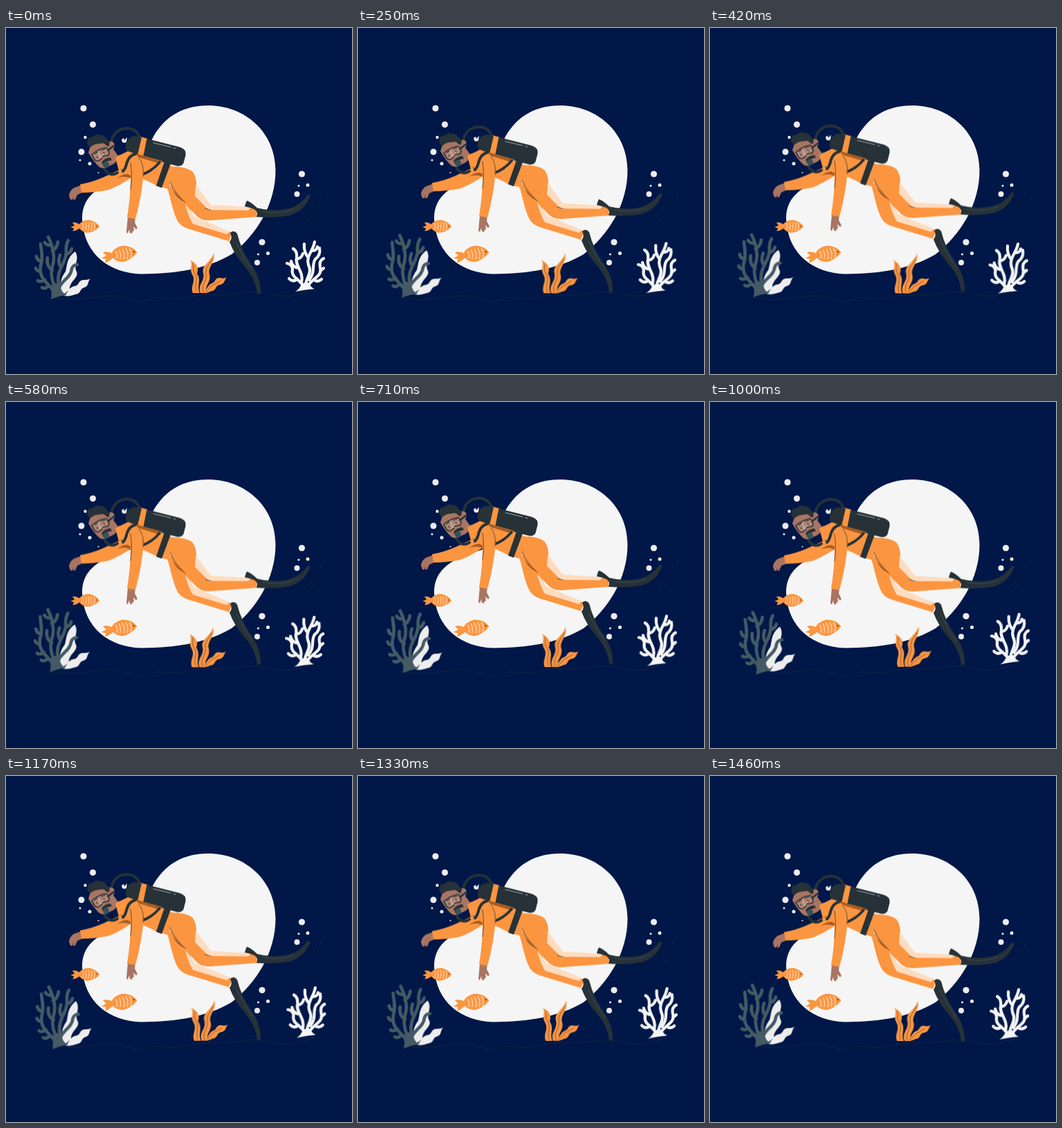
Animation, 500 px wide and 500 px high, one loop 1.5 s. Source, as an HTML page:

```html
<!DOCTYPE html>
<html lang="en">
<head>
<meta charset="utf-8">
<title>Diver</title>
<style>
  html, body { margin: 0; width: 100%; height: 100%; overflow: hidden; background: #001748; }
  svg { display: block; width: 100%; height: 100%; }
  .plants, .diver { transform-box: view-box; transform-origin: 250px 250px; }
  .suit { fill: #fc9540; }
  .dark { fill: #263238; }
  .skin { fill: #a87562; }
  .pale { fill: #ffdcc0; }
  .shade { fill: #a85c22; }
  .snow { fill: #ededed; }
  .white { fill: #f5f5f5; }
  .line { fill: none; stroke: #263238; stroke-linecap: round; stroke-linejoin: round; }
  .thin { stroke-width: .7; }
  .branch { fill: none; stroke-linecap: round; stroke-linejoin: round; }
  .stripe { fill: none; stroke: #fdc697; stroke-width: 1.8; stroke-linecap: round; }
</style>
</head>
<body>
<svg viewBox="0 0 500 500">
  <path class="white" d="M292 112C345 112 389 150 389.500 205C390 255 361 300 326 327C290 348 248 355 195 355.500C150 354 112 328 110 275C110 240 140 224 178 214C205 200 203 165 221 145C238 123 262 112 292 112Z"/>
  <path class="line" stroke-width=".8" opacity=".65" d="M62 389C82 392 98 394 120 390S160 385 180 393S208 388 222 390S250 393 268 388S308 388 330 384S366 381 388 386S424 384 446 378"/>
  <g id="bubbles" class="snow"></g>

  <g class="plants">
    <path class="snow" d="M82 386C75 373 80 360 86 352C89 342 87 333 100 323C107 334 97 343 102 352C106 361 91 366 92 378Z"/>
    <path class="snow" d="M84 387C90 382 91 374 99 373C106 373 104 364 112 364C116 364 119 364 122 362C117 368 120 373 113 375C106 377 109 384 100 385C94 387 90 388 84 387Z"/>
    <g class="branch" stroke="#455a64" stroke-width="4.600">
      <path d="M73 384C66 364 64 354 67 344C71 334 69 318 61 302M67 322Q74 318 75 309M65 314Q58 314 56 310"/>
      <path d="M70 382C62 368 47 364 50 344C54 332 51 322 50 312M51 337Q45 336 44 330M50 352Q44 351 43 347M56 364Q49 368 46 365M62 372Q56 378 52 375"/>
      <path d="M74 384C76 366 94 362 95 348Q97 342 103 342M76 370C72 350 87 340 87 324Q86 314 90 307M87 327Q93 326 95 319M80 346Q74 340 78 328M67 350Q58 344 60 332"/>
    </g>
    <path fill="#455a64" d="M65 392Q67 382 64 374L71 368L79 372Q79 382 88 386Q76 387 65 392Z"/>
    <g class="suit">
      <path d="M281 383C276 371 288 366 285 354C282 342 297 338 300 325C304 338 291 345 294 356C297 368 286 372 290 383Z"/>
      <path d="M270 383C266 372 275 366 269 356C264 348 271 342 266 335C276 340 279 346 276 355C283 364 275 374 280 383Z"/>
      <path d="M284 383C291 378 291 372 297 369C304 367 301 361 309 361C313 362 316 362 319 360C315 365 316 370 309 371C302 372 304 380 297 380C294 381 292 383 284 383Z"/>
    </g>
    <path class="line thin" stroke-opacity=".75" d="M285 382C281 370 292 364 289 354C288 345 296 340 298 333M275 381C271 370 279 364 273 355C268 348 273 344 270 340M288 381C296 377 296 371 302 370L310 365"/>
    <g class="branch" stroke="#f5f5f5" stroke-width="4.200">
      <path d="M433 376C430 364 444 356 437 342C433 330 444 322 446 309M437 332Q430 324 431 312M442 322Q449 322 450 316"/>
      <path d="M431 376C426 362 411 362 414 348Q413 341 406 340M421 363Q414 368 409 362M427 368C431 352 417 344 420 332Q421 322 415 319M420 334Q427 333 429 326M423 347Q414 346 412 337"/>
      <path d="M436 374C440 362 458 360 454 346Q452 336 459 333M454 351L459 347M445 364Q451 368 456 363M438 364C448 352 441 342 447 334Q455 328 453 318"/>
    </g>
    <path class="white" d="M418 381Q425 377 427 369L438 368Q440 375 446 377Q432 378 418 381Z"/>
  </g>

  <g id="fish"></g>

  <g class="diver">
    <path class="line thin" opacity=".6" d="M455 240Q454 262 434 282M447 247Q446 262 432 274"/>
    <!-- far arm -->
    <path class="skin" d="M109 227L98 231Q92 235 91 242L93 248L96 248L98 243L97 248L100 248L103 241L110 238Z"/>
    <path class="suit" d="M107 226Q124 223 140 216L166 204L184 214Q166 227 148 234Q128 238 109 238Z"/>
    <path class="shade" d="M160 217Q172 209 182 211L180 217Q170 213 160 217Z"/>
    <!-- hose and tank -->
    <path class="line" stroke-width="4" d="M152 166C154 150 166 145 175 145C187 146 192 152 193 160"/>
    <path class="snow" d="M167 161L170 159L171 162L175 158L174 165L171 166L168 165Z"/>
    <path class="suit" d="M194 157L205 160L200 188L188 184Z"/>
    <path class="dark" d="M196 158Q181 153 175 163Q170 174 176 179L190 184Z"/>
    <path class="dark" d="M203.500 160L251 172Q261 175 259.500 184L256.500 195.500Q253 201 246 199L198 187Z"/>
    <path class="line" style="stroke:#d5dadb" stroke-width=".7" d="M213 166L238 172M242 173L245 174"/>
    <!-- lower leg -->
    <path class="suit" d="M232 226C238 248 241 264 247 277Q251 286 263 290L322 308L327 296L272 274L252 236Z"/>
    <path class="pale" d="M258 250L272 273L324 294L319 298L270 283Q262 270 258 250Z"/>
    <!-- upper leg -->
    <path class="suit" d="M236 200Q262 200 270 208Q276 217 275 230L296 256L361 260L363 273L295 278Q281 279 273 269L238 234Z"/>
    <path class="pale" d="M274 226L296 255.500L354 259L350 263.500L293 263L273 243Z"/>
    <path class="line thin" d="M236 210C235 225 243 236 259 252M288 261L296 263"/>
    <path class="shade" d="M241 234Q250 244 260 253L257 251Q246 246 241 234Z"/>
    <!-- torso -->
    <path class="suit" d="M158 187L176 178Q192 184 218 190L240 200L236 233L218 228Q200 218 190 216Q174 214 165 201Z"/>
    <path class="shade" d="M186 181L226 192L222 196L192 187Z"/>
    <path class="dark" d="M229 193L238 196L225 231L217 228Z"/>
    <path class="line" stroke-width="3.500" d="M196 212Q211 207 222 194"/>
    <!-- near arm -->
    <path class="skin" d="M176 273L187 274L186 281L190 289L188 291L184 287L185 293L183 294L182 297L179 296L178 291L176 297L174 295Z"/>
    <path class="suit" d="M179 194Q184 184 194 189Q200 196 199 209Q196 244 187 276L175 274Q180 244 180 216Z"/>
    <path class="line thin" d="M180 195Q183 214 180 234M192 188Q200 196 198 214"/>
    <path class="line" stroke-width="4" d="M187 182Q178 184 174.500 195Q173 203 169 207"/>
    <!-- head -->
    <path class="line" stroke-width="4" d="M142 203C147 213 156 213 161 209"/>
    <path class="skin" d="M119 180L122 171L134 163L147 165Q152 162 156 166Q158 171 155 175L163 186Q160 196 150 199Q142 205 135 201Q127 194 119 180Z"/>
    <path class="dark" d="M121 173L117 167L119 159L126 157L131 153.500L135 155Q142 154 145 160L150 164L149 171L145 170Q142 165 136 167Q127 167 121 173Z"/>
    <path class="line" stroke-width="2.500" d="M147 177L156 170"/>
    <path d="M124 183Q134 174 145 173Q151 178 148 184L142 185Q139 184 138 189Q132 195 128 190Z" fill="#c6b2a8" fill-opacity=".25" stroke="#263238" stroke-width="1.600"/>
    <path class="line" stroke-width="1.200" d="M128 182L133 179M138 177L143 175M131 186L132 187M141 180L142 181"/>
    <path style="fill:none;stroke:#e4dcd8;stroke-width:.9" d="M133 178L137 188L141 182"/>
    <path class="dark" d="M138 194Q142 188 151 187L153 191Q145 192 140 198Z"/>
    <circle cx="144.500" cy="197.500" r="4.500" fill="#37505a"/>
    <path class="suit" d="M158 187L165 183L169 202L163 206Z"/>
    <!-- fins -->
    <path class="dark" d="M348 249.500Q355 252 363 260Q385 266 408 261Q425 257 436 241L440 242Q432 264 410 271Q388 275 362 273Q365 266 359 262Q352 259 345 258Q346 253 348 249.500Z"/>
    <path class="dark" d="M324 296Q329 291 334 297Q340 321 354 341Q369 362 368 384L363 384.500Q361 363 345 345Q330 328 323 309Q328 303 324 296Z"/>
    <path class="line thin" style="stroke:#46555d" d="M371 265Q395 270 416 262M333 310Q343 332 356 350"/>
  </g>
</svg>
<script>
const NS = 'http://www.w3.org/2000/svg';
const $ = s => document.querySelector(s);
const add = (parent, tag, attrs) => {
  const el = document.createElementNS(NS, tag);
  for (const k in attrs) el.setAttribute(k, attrs[k]);
  return parent.appendChild(el);
};

// x, y, radius
[
  [112, 116, 4.6], [125.5, 139.5, 4.5], [114.5, 158, 2.2], [109, 179, 4.5],
  [107, 191, 1.5], [121, 196, 2.5], [133.5, 209, 1],
  [427.5, 211, 4.6], [423, 228, 1.6], [436, 227, 2.5], [420.5, 240, 4],
  [370, 309.5, 4.6], [364.5, 327, 1.6], [378.5, 325.5, 2.6], [363, 339, 4]
].forEach(([cx, cy, r]) => add($('#bubbles'), 'circle', { cx, cy, r }));

// Body runs from 0 to 38 along x, with the tail on the left.
function fish(x, y, scale, angle) {
  const g = add($('#fish'), 'g', { transform: `translate(${x} ${y}) rotate(${angle}) scale(${scale})` });
  const part = (cls, d) => add(g, 'path', { class: cls, d });
  part('suit', 'M4 -2Q-3 -8 -10 -6L-6 -1L-13 2L-7 4L-9 9Q-1 8 4 2Z');
  part('suit', 'M0 0Q5 -11 19 -12Q33 -10 38 0Q29 10 16 11Q5 9 0 0Z');
  for (let i = 0; i < 5; i++) {
    const sx = 8 + i * 5, h = 5 + Math.min(i, 2);
    part('stripe', `M${sx} ${-h}Q${sx + 3} 0 ${sx} ${h}`);
  }
  add(g, 'circle', { class: 'dark', cx: 33.5, cy: -1.5, r: 1 });
}
fish(104, 286.5, .82, 2);
fish(151, 329, 1.02, -7);

// The loop is drawn at 24 pictures a second, each held until the next.
const LOOP = 1500, PICTURES = 36, LEAD = 5;
const start = document.timeline.currentTime - LEAD;

function play(sel, steps) {
  const keys = steps.map(([offset, transform], i) => {
    const next = steps[i + 1];
    const count = next ? Math.round((next[0] - offset) * PICTURES) : 1;
    return { offset, transform, easing: `steps(${count})` };
  });
  $(sel).animate(keys, { duration: LOOP, iterations: Infinity }).startTime = start;
}
play('.diver', [[0, 'translateY(0px)'], [.5, 'translateY(-6.4px)'], [1, 'translateY(0px)']]);
play('.plants', [[0, 'rotate(0deg)'], [.25, 'rotate(1deg)'], [.75, 'rotate(-1deg)'], [1, 'rotate(0deg)']]);
</script>
</body>
</html>
```
